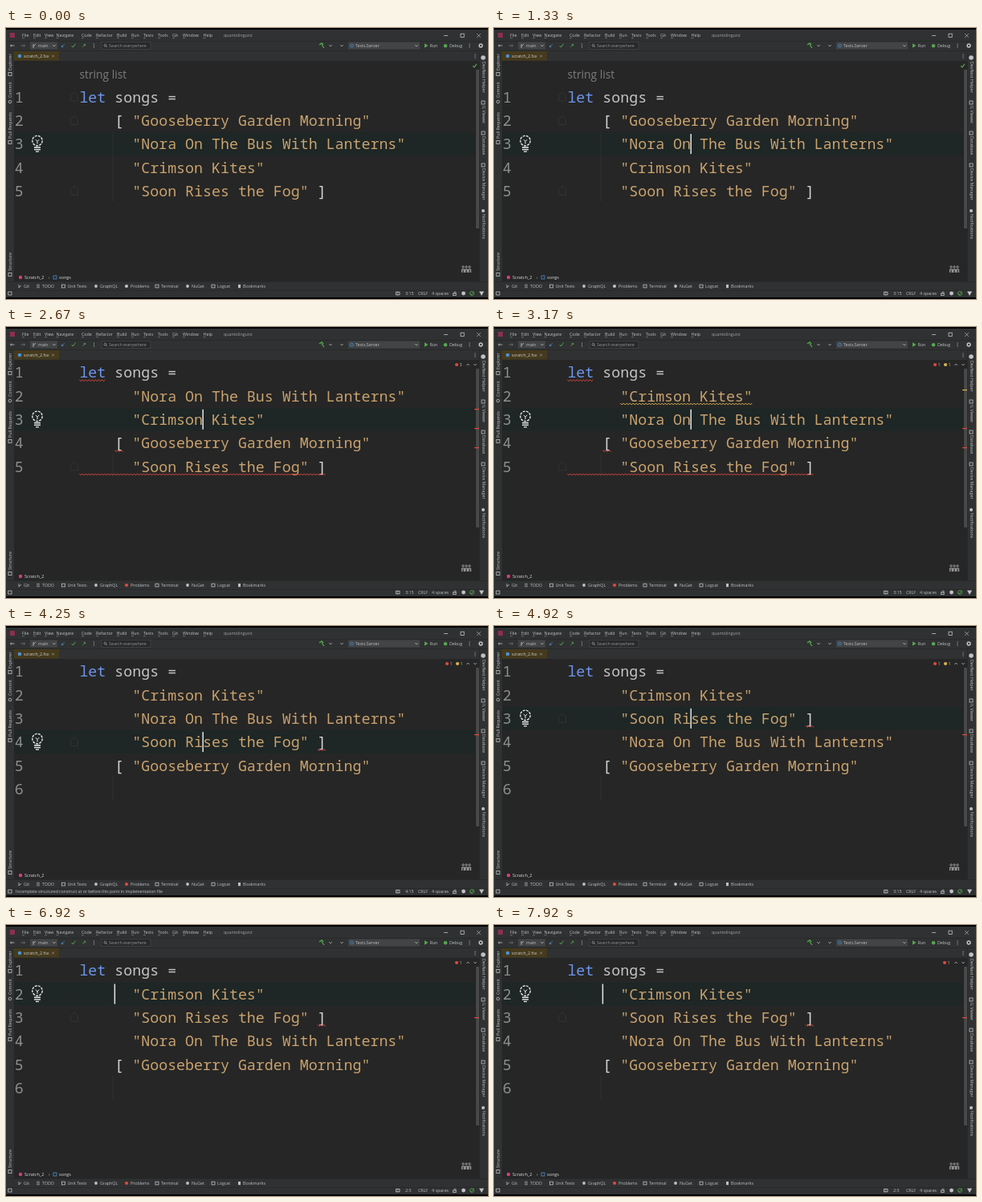
Animation, 600 px wide and 338 px high, one loop 8000 ms. Source, as an HTML page with a canvas:

```html
<!DOCTYPE html>
<html lang="en">
<head>
<meta charset="utf-8">
<title>Sorting a list in the editor</title>
<style>
  html, body { margin: 0; width: 100%; height: 100%; overflow: hidden; background: #000; }
  canvas { display: block; width: 600px; height: 338px; }
</style>
</head>
<body>
<canvas id="stage"></canvas>
<script>
const LOOP = 8000, BLINK = 500;
const LEFT = 91.4, CHAR = 10.98, PITCH = 29.3;
const MONO = '18.3px "Noto Sans Mono", monospace';
const C = {
  panel: '#303132', editor: '#262626', line: '#1e2626', edge: '#242526', button: '#424446',
  text: '#bfc1c3', dim: '#777', number: '#8e8e8e', code: '#c4c4c4', bracket: '#d8d8d8',
  keyword: '#6c95eb', string: '#c9a26d', red: '#e0483e', yellow: '#d6b24c',
  green: '#55a84f', blue: '#4b8fd0', pink: '#d0407c'
};
const SONGS = {
  S: 'Gooseberry Garden Morning',
  L: 'Nora On The Bus With Lanterns',
  E: 'Crimson Kites',
  H: 'Soon Rises the Fog'
};

// Each entry changes part of the editor state; moving the caret restarts its blinking.
const EVENTS = [
  [0, { order: 'SLEH', row: 3, col: 15, pos: '3:15', hint: true, marks: 'ok', rows: 5, crumb: true, message: '' }],
  [1500, { order: 'LSEH', row: 2, pos: '2:15' }],
  [1750, { hint: false, marks: 'broken', crumb: false }],
  [1920, { row: 3, pos: '3:15' }],
  [2330, { row: 4, pos: '4:15' }],
  [2500, { order: 'LESH', row: 3, pos: '3:15' }],
  [2750, { order: 'ELSH', row: 2, pos: '2:15', marks: 'warned' }],
  [3080, { row: 3, pos: '3:15' }],
  [3420, { row: 4, pos: '4:15' }],
  [3580, { row: 5, pos: '5:15' }],
  [3830, { order: 'ELHS', row: 4, pos: '4:15', rows: 6 }],
  [4080, { marks: 'closing', message: 'Incomplete structured construct at or before this point in implementation file' }],
  [4670, { order: 'EHLS', row: 3, pos: '3:15', message: '' }],
  [5000, { marks: 'single', crumb: true }],
  [5750, { row: 3, col: 7 }],
  [5920, { pos: '3:7' }],
  [6250, { row: 2, pos: '2:7' }],
  [6500, { col: 6, pos: '2:6' }],
  [6750, { col: 5, pos: '2:5' }]
];

const canvas = document.getElementById('stage');
const g = canvas.getContext('2d');
const ratio = window.devicePixelRatio || 1;
canvas.width = 600 * ratio;
canvas.height = 338 * ratio;

function rect(x, y, w, h, color) {
  g.fillStyle = color;
  g.fillRect(x, y, w, h);
}

function trace(points) {
  g.beginPath();
  points.forEach(([x, y]) => g.lineTo(x, y));
}

function stroke(points, color, width = 0.8) {
  g.strokeStyle = color;
  g.lineWidth = width;
  trace(points);
  g.stroke();
}

function fill(points, color) {
  g.fillStyle = color;
  trace(points);
  g.fill();
}

function box(x, y, w, h, color) {
  g.strokeStyle = color;
  g.lineWidth = 0.8;
  g.strokeRect(x, y, w, h);
}

function dot(x, y, r, color) {
  g.fillStyle = color;
  g.beginPath();
  g.arc(x, y, r, 0, 7);
  g.fill();
}

function ring(x, y, r, color, width = 0.8) {
  g.strokeStyle = color;
  g.lineWidth = width;
  g.beginPath();
  g.arc(x, y, r, 0, 2 * Math.PI);
  g.stroke();
}

function label(text, x, y, color = C.text, size = 5.3) {
  g.font = size + 'px "Open Sans", sans-serif';
  g.textBaseline = 'middle';
  g.fillStyle = color;
  g.fillText(text, x, y);
}

function code(text, column, y, color) {
  g.font = MONO;
  g.textBaseline = 'alphabetic';
  g.fillStyle = color;
  g.fillText(text, LEFT + column * CHAR, y + 6.7);
}

function vertical(text, x, y, angle) {
  g.save();
  g.translate(x, y);
  g.rotate(angle);
  label(text, 0, 0);
  g.restore();
}

function chevron(x, y, color = C.text, up = false) {
  const d = up ? -1 : 1;
  stroke([[x - 1.8, y - d], [x, y + d], [x + 1.8, y - d]], color, 0.7);
}

function arrow(x, y, dx, dy, color) {
  const ex = x + dx * 2.5, ey = y + dy * 2.5;
  stroke([[x - dx * 2.5, y - dy * 2.5], [ex, ey]], color);
  const turn = a => {
    const c = Math.cos(a), s = Math.sin(a);
    return [ex - 2.2 * (dx * c - dy * s), ey - 2.2 * (dx * s + dy * c)];
  };
  stroke([turn(0.7), [ex, ey], turn(-0.7)], color);
}

function more(x, y) {
  [-2, 0, 2].forEach(d => dot(x, y + d, 0.6, C.text));
}

function cross(x, y, r, color) {
  stroke([[x - r, y - r], [x + r, y + r]], color, 0.7);
  stroke([[x + r, y - r], [x - r, y + r]], color, 0.7);
}

function tick(x, y, color, width = 1) {
  stroke([[x - 2.2, y], [x - 0.7, y + 2], [x + 2.5, y - 2.3]], color, width);
}

function squiggle(fromColumn, toColumn, y, color) {
  const points = [];
  const end = LEFT + toColumn * CHAR;
  for (let x = LEFT + fromColumn * CHAR, i = 0; x <= end; x += 2, i++) points.push([x, y + (i % 2 ? 1 : -1)]);
  stroke(points, color, 1);
}

function drawTop() {
  rect(5, 6, 6, 6, '#8a2f52');
  const menu = { File: 20, Edit: 34, View: 48, Navigate: 62.5, Code: 94, Refactor: 112, Build: 138, Run: 156,
    Tests: 171, Tools: 189, Git: 207, Window: 220, Help: 245.5 };
  for (const [name, x] of Object.entries(menu)) {
    label(name, x, 9.5);
    stroke([[x, 12.6], [x + 3, 12.6]], C.text, 0.4);
  }
  label('quantolinguist', 271, 9.5, '#a5a5a5');
  stroke([[545, 9.5], [550, 9.5]], C.text);
  box(566, 7.2, 4.2, 4.2, C.text);
  cross(588.5, 9.5, 2.3, C.text);

  arrow(8, 22, -1, 0, C.text);
  arrow(21, 22, 1, 0, C.dim);
  rect(30, 17.5, 34, 9, C.button);
  stroke([[34, 20], [34, 25]], C.text);
  stroke([[34, 23], [37, 20]], C.text);
  label('main', 40, 22.3);
  chevron(60, 22);
  arrow(71, 22, -0.7, 0.7, C.blue);
  tick(84, 22, C.green);
  arrow(97, 22, 0.7, -0.7, C.green);
  more(109.5, 22);
  rect(119, 17.5, 61, 9, '#28292a');
  box(119, 17.5, 61, 9, '#434445');
  ring(123.5, 21.7, 1.4, C.text, 0.6);
  stroke([[124.5, 22.7], [126, 24.2]], C.text, 0.6);
  label('Search everywhere', 128, 22.3, '#929496');

  stroke([[390, 21], [393, 19], [395, 21]], C.green, 1.5);
  stroke([[393, 21], [396, 25]], C.green, 1.2);
  chevron(404, 22);
  chevron(418, 22);
  rect(426, 17.5, 89, 9, C.button);
  ring(430.5, 22, 1.9, C.blue);
  label('Tests.Server', 435, 22.3);
  chevron(511, 22);
  fill([[521, 19.3], [525.5, 22], [521, 24.7]], C.green);
  label('Run', 527.5, 22.3);
  dot(547, 22.3, 2.2, C.green);
  label('Debug', 552, 22.3);
  more(577, 22);
  ring(591, 22, 1.9, C.text, 1.5);

  rect(10, 29, 56, 11.5, '#453a1d');
  dot(17, 35, 2.3, C.blue);
  label('scratch_2.fsx', 22, 35.2, '#d2d2d0');
  cross(58.5, 35, 1.4, '#a39a80');
  more(584, 35);
}

function drawSides() {
  [['Explorer', 53], ['Commit', 87], ['Pull Requests', 138], ['Structure', 303]].forEach(([name, y]) => {
    vertical(name, 5.3, y, -Math.PI / 2);
    if (name === 'Commit') ring(5, y + 5, 1.8, C.text);
    else box(3, y + 2.5, 4, 4, C.text);
  });
  [['DevNest Helper', 42], ['IL Viewer', 97], ['Database', 135], ['Device Manager', 175],
    ['Notifications', 232]].forEach(([name, y], i) => {
    vertical(name, 594.3, y, Math.PI / 2);
    if (i === 0) dot(594, y - 5, 2.8, C.text);
    else if (i === 4) dot(594, y - 4, 2, C.text);
    else box(592, y - 6, 4, 4, C.text);
  });
}

function drawBottom(s) {
  dot(18, 311, 2.2, C.pink);
  label('Scratch_2', 23, 311.2, '#dedede', 5.5);
  if (s.crumb) {
    label('›', 53, 311.2);
    box(59, 309, 4, 4, C.blue);
    label('songs', 66, 311.2, '#dedede', 5.5);
  }
  for (let x = 569; x < 580; x += 4) {
    ring(x, 298, 1.2, '#bbb', 0.7);
    stroke([[x - 1.6, 305], [x - 1.6, 301], [x + 1.6, 301], [x + 1.6, 305]], '#bbb', 0.8);
    stroke([[x, 301], [x, 305]], '#bbb', 0.6);
  }
  const tools = { Git: 22, TODO: 45, 'Unit Tests': 76.5, GraphQL: 117, Problems: 155, Terminal: 193, NuGet: 231,
    Logcat: 263, Bookmarks: 295 };
  for (const [name, x] of Object.entries(tools)) {
    label(name, x, 322.3);
    if (name === 'Problems') dot(x - 5, 322, 2.1, s.marks === 'ok' ? C.text : C.red);
    else if (name === 'GraphQL' || name === 'NuGet') dot(x - 5, 322, 1.9, C.text);
    else if (name === 'Git') stroke([[x - 6, 320], [x - 6, 324], [x - 3, 321]], C.text);
    else if (name === 'TODO') [320.3, 322, 323.7].forEach(y => stroke([[x - 7, y], [x - 3, y]], C.text, 0.6));
    else if (name === 'Bookmarks') rect(x - 6, 320, 3, 4.2, C.text);
    else box(x - 7, 320.2, 4, 3.7, C.text);
  }
  box(2.8, 329, 4.2, 4, C.text);
  label(s.message, 12, 331.3, C.text, 5.1);
  box(485.5, 329.3, 4.5, 3.5, C.text);
  stroke([[487.7, 328.5], [487.7, 333.5]], C.text, 0.6);
  label(s.pos, 497, 331.3);
  label('CRLF', 513, 331.3);
  label('4 spaces', 530, 331.3);
  box(556.5, 331, 3.7, 2.5, C.text);
  ring(559, 330, 1.2, C.text, 0.6);
  dot(569.5, 331, 2.4, C.text);
  ring(580, 331, 2.5, C.green);
  tick(580, 331, C.green, 0.7);
  fill([[589, 328.5], [595, 328.5], [592, 334]], C.text);
}

function drawBulb(y) {
  const white = '#e6e6e6';
  g.setLineDash([3, 1.2]);
  ring(39, y - 4, 6.2, white, 1.4);
  g.setLineDash([]);
  stroke([[36.8, y - 5.5], [39, y - 3], [41.2, y - 5.5]], white, 1);
  stroke([[39, y - 3], [39, y]], white, 1);
  stroke([[35, y + 4.3], [43, y + 4.3]], white, 1.6);
  stroke([[35, y + 7], [43, y + 7]], white, 1.4);
  stroke([[37, y + 9.5], [41, y + 9.5]], white, 1.3);
}

function drawMarks(s, rowY) {
  const open = rowY(s.order.indexOf('S') + 2), close = rowY(s.order.indexOf('H') + 2);
  const stripe = (y, color) => rect(583, y, 6, 1.2, color);
  const counts = { broken: [3], warned: [1, 1], closing: [1, 1], single: [1] }[s.marks];
  if (!counts) {
    tick(583.5, 47, C.green, 1.2);
    return;
  }
  const start = counts.length > 1 ? 549 : 561;
  counts.forEach((n, i) => {
    dot(start + 13 * i, 47, 2.1, i ? C.yellow : C.red);
    label(n, start + 3.5 + 13 * i, 47.3);
  });
  chevron(575, 47, C.text, true);
  chevron(584, 47);

  if (s.marks === 'broken' || s.marks === 'warned') {
    squiggle(0, 3, rowY(1) + 10, C.red);
    squiggle(4, 5, open + 10, C.red);
    squiggle(0, 28, rowY(5) + 10, C.red);
    stripe(126, C.red);
    stripe(150, C.red);
    if (s.marks === 'warned') {
      squiggle(6, 21, rowY(s.order.indexOf('E') + 2) + 10, C.yellow);
      stripe(78, C.yellow);
    } else stripe(102, C.red);
  } else {
    squiggle(27, 28, close + 10, C.red);
    stripe(s.marks === 'closing' ? 135 : 115, C.red);
  }
}

function drawEditor(s, caretOn) {
  const rowY = row => (s.hint ? 86 : 56.7) + PITCH * (row - 1);
  rect(10, 41, 579, 263, C.editor);
  const y = rowY(s.row);
  rect(10, y - 14.3, 573, 28.6, C.line);
  rect(585, 52, 4, 198, '#484848');

  g.setLineDash([1, 2]);
  stroke([[85, 42], [85, 304]], '#303030', 0.7);
  const openRow = s.order.indexOf('S') + 2;
  stroke([[133, rowY(openRow) + 15], [133, rowY(s.rows) + 14]], '#505050', 0.8);
  g.setLineDash([]);
  const folds = s.marks === 'ok' ? [1, 2, 5] : [s.order.indexOf('H') + 2];
  folds.forEach(row => {
    const f = rowY(row);
    stroke([[80.5, f + 5], [80.5, f - 2], [85, f - 6], [89.5, f - 2], [89.5, f + 5], [80.5, f + 5]], '#383838', 0.7);
  });

  if (s.hint) label('string list', 91.5, 59.2, '#7d7d7d', 13.8);
  for (let row = 1; row <= s.rows; row++) code(row, -7.35, rowY(row), C.number);
  code('let', 0, rowY(1), C.keyword);
  code('songs =', 4, rowY(1), C.code);
  [...s.order].forEach((key, i) => {
    const lineY = rowY(i + 2);
    code(`"${SONGS[key]}"`, 6, lineY, C.string);
    if (key === 'S') code('[', 4, lineY, C.bracket);
    if (key === 'H') code(']', 27, lineY, C.bracket);
  });
  drawMarks(s, rowY);
  drawBulb(y);
  if (caretOn) rect(LEFT + (s.col - 1) * CHAR - 0.7, y - 12.5, 1.5, 25, '#e4e4e4');
}

function draw(time) {
  const state = {};
  let blinkStart = -750;
  for (const [at, change] of EVENTS) {
    if (at > time) break;
    Object.assign(state, change);
    if (at && (change.row || change.col)) blinkStart = at;
  }
  const caretOn = Math.floor((time - blinkStart) / BLINK) % 2 === 0;

  g.setTransform(ratio, 0, 0, ratio, 0, 0);
  rect(0, 0, 600, 338, '#000');
  rect(0, 2, 600, 334, C.panel);
  drawEditor(state, caretOn);
  rect(10, 304, 579, 12, C.editor);
  [16, 28, 316, 327].forEach(y => rect(0, y, 600, 0.6, C.edge));
  rect(10, 28, 0.6, 288, C.edge);
  rect(589, 28, 0.6, 288, C.edge);
  drawTop();
  drawSides();
  drawBottom(state);
}

const began = performance.now();
function frame() {
  draw((performance.now() - began) % LOOP);
  requestAnimationFrame(frame);
}
frame();
</script>
</body>
</html>
```
